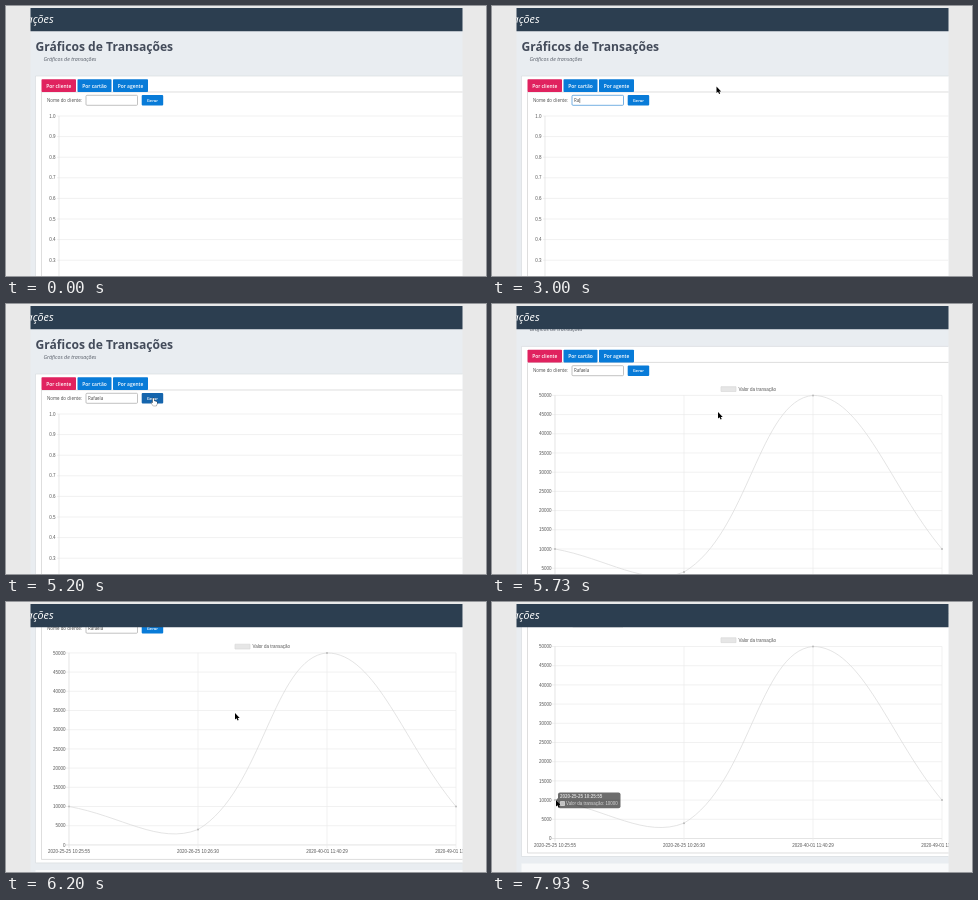
Animation of 480x270 px, one loop 8000 ms. Source, as an HTML page with a canvas:

```html
<!DOCTYPE html>
<html lang="pt">
<head>
<meta charset="utf-8">
<style>
html, body { margin: 0; width: 100%; height: 100%; overflow: hidden; background: #e9e9e9; }
canvas { display: block; }
</style>
</head>
<body>
<canvas id="stage" width="480" height="270"></canvas>
<script>
const ctx = document.getElementById('stage').getContext('2d');
const LOOP = 8000;
const SANS = '"Open Sans", sans-serif';
const ARIAL = '"Liberation Sans", Arial, sans-serif';
const BLUE = '#087bd8';
const CLIENT = 'Rafaela';
const KEY_TIMES = [2600, 3000, 3270, 3400, 3470, 3600, 3670];
const CLICK_INPUT = 1560, CLICK_BUTTON = 5070, CHART_SHOWN = 5270, TOOLTIP_SHOWN = 7830;

// Keys are [time, x, y]
const pointerPath = [
  [800, 189, 268], [1000, 172, 210], [1200, 145, 148], [1400, 115, 104], [1600, 106, 94],
  [1670, 107, 94], [1870, 150, 92], [2070, 203, 84], [2270, 224.5, 80.5],
  [4200, 224.5, 80.5], [4400, 211, 83], [4670, 166, 92], [4930, 147, 94.5],
  [5270, 147, 94.5], [5400, 172, 98], [5600, 221, 107], [5730, 226, 108],
  [5930, 229, 111], [6470, 229, 111], [6670, 202, 121], [6870, 150, 143],
  [7070, 106, 165], [7270, 70, 190], [7400, 65, 194], [7600, 64, 198]
];
const scrollPath = [[5570, 0], [5730, 27.5], [5870, 42], [5930, 44], [6070, 46.5], [6200, 68], [6270, 74.5]];

function track(keys, t) {
  const next = keys.findIndex(k => k[0] > t);
  if (next < 0) return keys[keys.length - 1].slice(1);
  if (next === 0) return keys[0].slice(1);
  const a = keys[next - 1], b = keys[next];
  const p = (t - a[0]) / (b[0] - a[0]);
  return a.slice(1).map((v, i) => v + (b[i + 1] - v) * p);
}

function text(str, x, y, font, color, align = 'left') {
  ctx.font = font;
  ctx.fillStyle = color;
  ctx.textAlign = align;
  ctx.fillText(str, x, y);
}

function box(x, y, w, h, fill, stroke, radius = 0) {
  ctx.beginPath();
  ctx.roundRect(x, y, w, h, radius);
  if (fill) { ctx.fillStyle = fill; ctx.fill(); }
  if (stroke) { ctx.strokeStyle = stroke; ctx.stroke(); }
}

function line(x1, y1, x2, y2, color = '#ebebeb') {
  ctx.strokeStyle = color;
  ctx.beginPath();
  ctx.moveTo(x1, y1);
  ctx.lineTo(x2, y2);
  ctx.stroke();
}

function drawForm(t, hover) {
  text('Gráficos de Transações', 29.5, 45.2, `bold 12.1px ${SANS}`, '#434b5a');
  text('Gráficos de transações', 37.5, 54.6, `italic 5.3px ${SANS}`, '#555b66');

  box(29.5, 70, 440, 259, '#fff', '#d9dde0');
  box(35.5, 86, 440, 239.5, null, '#d0d0d0');
  [['Por cliente', 35.5, 34.5, '#e0225f'], ['Por cartão', 71.5, 34, BLUE], ['Por agente', 107, 35, BLUE]]
    .forEach(([label, x, w, color]) => {
      box(x, 73.3, w, 12.7, color, null, 0.8);
      text(label, x + w / 2, 81.6, `600 4.9px ${SANS}`, '#fff', 'center');
    });

  text('Nome do cliente:', 41, 96, `4.4px ${SANS}`, '#444');
  const focused = t >= CLICK_INPUT && t < CLICK_BUTTON;
  box(80, 89.3, 51.5, 10, '#fff', focused ? '#3a8fd6' : '#a8a8a8', 1);
  const typed = CLIENT.slice(0, KEY_TIMES.filter(k => t >= k).length);
  text(typed, 82, 95.9, `4.4px ${SANS}`, '#444');
  if (focused) {
    const caret = 82.6 + ctx.measureText(typed).width;
    line(caret, 92, caret, 97, '#666');
  }
  box(135.7, 89, 21.5, 10.6, hover ? '#1565ad' : BLUE, null, 1);
  text('Gerar', 146.4, 95.8, `600 4.2px ${SANS}`, '#fff', 'center');
}

function drawEmptyChart() {
  for (let i = 0; i < 9; i++) {
    const y = 110 + i * 20.6;
    line(51, y, 457, y);
    text((1 - i / 10).toFixed(1), 49.5, y + 1.6, `4.5px ${ARIAL}`, '#555', 'right');
  }
  line(53, 110, 53, 325, '#dedede');
}

// Smooth cubic through the points, with control points kept inside the plot
function drawCurve(points, top, bottom) {
  const clamp = y => Math.min(bottom, Math.max(top, y));
  const dist = (a, b) => Math.hypot(a[0] - b[0], a[1] - b[1]);
  const controls = points.map((p, i) => {
    const prev = points[i - 1] || p, next = points[i + 1] || p;
    const before = dist(prev, p), after = dist(p, next);
    const at = f => [p[0] + f * (next[0] - prev[0]), clamp(p[1] + f * (next[1] - prev[1]))];
    return { before: at(-0.4 * before / (before + after)), after: at(0.4 * after / (before + after)) };
  });
  ctx.strokeStyle = '#d9d9d9';
  ctx.beginPath();
  ctx.moveTo(...points[0]);
  for (let i = 1; i < points.length; i++) {
    ctx.bezierCurveTo(...controls[i - 1].after, ...controls[i].before, ...points[i]);
  }
  ctx.stroke();
  points.forEach(([x, y]) => {
    ctx.beginPath();
    ctx.arc(x, y, 1, 0, 7);
    ctx.fillStyle = '#bbb';
    ctx.fill();
  });
}

function drawChart(t) {
  const top = 119, bottom = 311, left = 63, step = 129;
  const font = `4.5px ${ARIAL}`;
  box(229, 110.3, 15, 4.8, '#e6e6e6', '#d8d8d8');
  text('Valor da transação', 246.5, 114.2, font, '#555');
  for (let i = 0; i <= 10; i++) {
    const y = top + i * 19.2;
    line(60, y, 450, y, i === 10 ? '#d8d8d8' : '#ebebeb');
    text(50000 - i * 5000, 59.5, y + 1.6, font, '#555', 'right');
  }
  ['2020-25-25 10:25:55', '2020-26-25 10:26:30', '2020-40-01 11:40:29', '2020-49-01 11:49:05'].forEach((label, i) => {
    const x = left + i * step;
    line(x, top, x, bottom + 3, i ? '#ebebeb' : '#d8d8d8');
    text(label, x, 319, font, '#555', 'center');
  });
  const grow = 1 - (1 - Math.min(1, (t - CHART_SHOWN) / 450)) ** 4;
  const points = [10, 4, 50, 10].map((v, i) => [left + i * step, bottom - v / 50 * 192 * grow]);
  drawCurve(points, top, bottom);
}

function drawTooltip(t) {
  ctx.globalAlpha = Math.min(1, (t - TOOLTIP_SHOWN) / 140);
  box(66, 190.5, 62.5, 15.7, 'rgba(0,0,0,.8)', null, 2);
  ctx.fillStyle = 'rgba(0,0,0,.8)';
  ctx.beginPath();
  ctx.moveTo(66, 196);
  ctx.lineTo(64, 198);
  ctx.lineTo(66, 200);
  ctx.fill();
  text('2020-25-25 10:25:55', 68, 196.3, `bold 4.5px ${ARIAL}`, '#fff');
  box(68.5, 199.5, 4, 4, '#e2e2e2', '#fff');
  text('Valor da transação: 10000', 74, 203.2, `4.45px ${ARIAL}`, '#fff');
  ctx.globalAlpha = 1;
}

const arrow = new Path2D('M0 0V6.6L1.5 5.3L2.6 7.6L3.7 7.1L2.7 4.9H4.7Z');
const hand = new Path2D('M-.3 0Q.5-.7 1.2 0V2.6L3.8 3.2Q4.3 3.5 4 5L3.4 7.2H.2L-1.8 4.4Q-1.8 3.6-.3 4.4Z');
const beam = new Path2D('M-1-3H1M0-3V3M-1 3H1');

function drawPointer(x, y, kind) {
  ctx.save();
  ctx.translate(x, y);
  if (kind === 'beam') {
    ctx.strokeStyle = '#222';
    ctx.stroke(beam);
  } else {
    const isHand = kind === 'hand';
    ctx.strokeStyle = isHand ? '#222' : '#fff';
    ctx.stroke(isHand ? hand : arrow);
    ctx.fillStyle = isHand ? '#fff' : '#000';
    ctx.fill(isHand ? hand : arrow);
  }
  ctx.restore();
}

function draw(t) {
  const [scroll] = track(scrollPath, t);
  const [x, y] = track(pointerPath, t);
  const pageY = y + scroll;
  const inside = (x1, x2) => t >= 800 && x > x1 && x < x2 && pageY > 89 && pageY < 100;
  const overButton = inside(135, 158);

  ctx.fillStyle = '#e9e9e9';
  ctx.fillRect(0, 0, 480, 270);
  ctx.save();
  ctx.beginPath();
  ctx.rect(24.5, 2, 432, 268);
  ctx.clip();
  ctx.lineWidth = 0.7;
  box(24, 2, 433, 268, '#e9edf1');

  ctx.save();
  ctx.translate(0, -scroll);
  drawForm(t, overButton);
  if (t < CHART_SHOWN) drawEmptyChart();
  else drawChart(t);
  box(29.5, 336, 440, 40, '#f8f9fa');
  ctx.restore();

  box(24, 2, 433, 23.3, '#2c3e50');
  text('Transações', 47.5, 17.3, `italic 10.8px ${SANS}`, '#fff', 'right');
  ctx.restore();

  ctx.lineWidth = 0.7;
  if (t >= 800) drawPointer(x, y, overButton ? 'hand' : inside(80, 132) ? 'beam' : 'arrow');
  if (t >= TOOLTIP_SHOWN) drawTooltip(t);
}

function frame() {
  draw(performance.now() % LOOP);
  requestAnimationFrame(frame);
}
frame();
</script>
</body>
</html>
```
